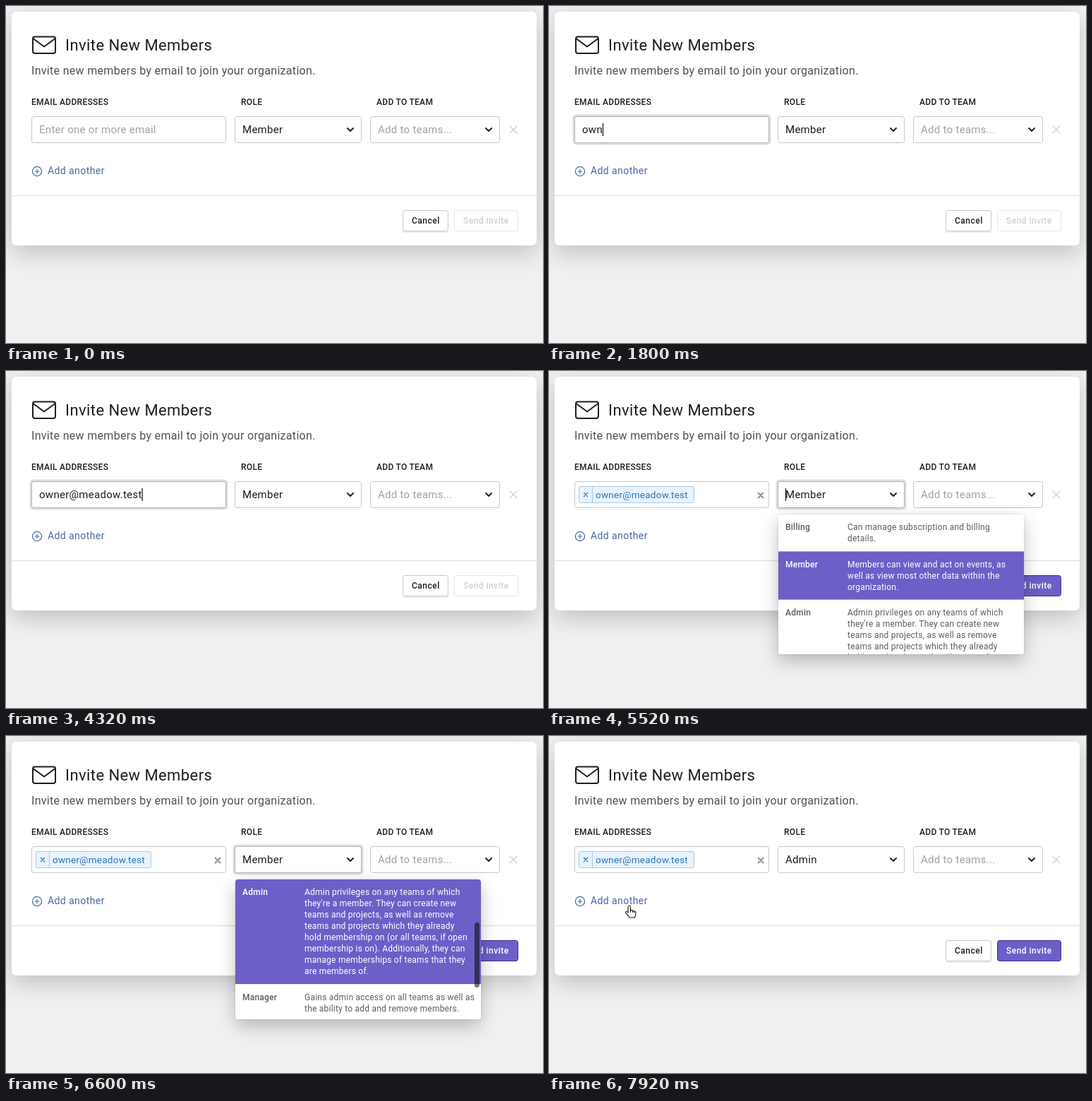
Recreate the animation shown at these times as an HTML page. Size 761 by 477 pixels, loop 8 s.

```html
<!DOCTYPE html>
<html lang="en">
<head>
<meta charset="utf-8">
<title>Invite New Members</title>
<style>
  html, body { margin: 0; width: 100%; height: 100%; overflow: hidden; background: #f0f0f1; }
  svg { display: block; width: 761px; height: 477px; }
  text { font-family: Roboto, Inter, sans-serif; font-size: 15px; letter-spacing: .019em; fill: #1d1d22; white-space: pre; }
  .title { font-size: 22px; }
  .subtitle { font-size: 16px; fill: #505055; }
  .label { font-size: 12px; font-weight: 500; letter-spacing: .025em; }
  .button { font-size: 12px; font-weight: 500; letter-spacing: .04em; }
  .link { font-size: 14px; letter-spacing: .03em; fill: #4a66a5; }
  .hint { fill: #a2a2a6; }
  .chip { font-size: 13.5px; fill: #2676bd; }
  .field { fill: #fff; stroke: #c8c8cc; }
  .focused { stroke: #b2b2b7; }
  .line { fill: none; stroke-linecap: round; stroke-linejoin: round; }
  .panel { filter: drop-shadow(0 10px 16px rgba(0, 0, 0, .2)); }
  .menu-box { filter: drop-shadow(0 9px 13px rgba(0, 0, 0, .22)) drop-shadow(0 0 1px rgba(0, 0, 0, .16)); }
  .row rect { fill: #fff; }
  .row text { font-size: 12px; fill: #5c5c62; }
  .row .name { font-weight: 500; }
  .row.chosen rect { fill: #f4f4f6; }
  .row.chosen text { fill: #29292f; }
  .row.active rect { fill: #6c5fc7; }
  .row.active text { fill: #fff; }
</style>
</head>
<body>
<svg viewBox="0 0 761 477">
  <defs>
    <clipPath id="menuClip"><rect x="325" y="203" width="348" height="198" rx="4"/></clipPath>
    <path id="chevron" class="line" d="M-4-2 0 2 4-2" stroke="#222228" stroke-width="2"/>
    <path id="cross" class="line" d="M-1-1 1 1M1-1-1 1" vector-effect="non-scaling-stroke"/>
  </defs>

  <rect class="panel" x="8" y="8" width="744" height="331" rx="7" fill="#fff"/>
  <g class="line" stroke="#1d1d22" stroke-width="2">
    <rect x="38" y="43.5" width="32" height="23.5" rx="3"/>
    <path d="M39 46.5 54 57.5 69 46.5"/>
  </g>
  <text class="title" x="84" y="62.5">Invite New Members</text>
  <text class="subtitle" x="36" y="97">Invite new members by email to join your organization.</text>
  <text class="label" x="36" y="140">EMAIL ADDRESSES</text>
  <text class="label" x="333" y="140">ROLE</text>
  <text class="label" x="525" y="140">ADD TO TEAM</text>

  <rect id="ring" y="153.5" height="43" rx="5" fill="#dedee1"/>
  <rect id="emailField" class="field" x="36.5" y="156.5" width="275" height="37" rx="3"/>
  <rect id="roleField" class="field" x="324.5" y="156.5" width="179" height="37" rx="3"/>
  <rect class="field" x="516.5" y="156.5" width="183" height="37" rx="3"/>

  <text id="hint" class="hint" x="47" y="180">Enter one or more email</text>
  <text id="typed" x="47" y="180"></text>
  <g id="chip">
    <rect x="42.5" y="163.5" width="163" height="23" rx="2" fill="#e8f3fc" stroke="#a4cdea"/>
    <path d="M61.5 164v22" stroke="#a4cdea"/>
    <use href="#cross" transform="translate(52 175) scale(2.5)" stroke="#2676bd" stroke-width="1.4"/>
    <text id="chipText" class="chip" x="66" y="180"></text>
    <use href="#cross" transform="translate(300 176) scale(3.5)" stroke="#8b8b90" stroke-width="1.8"/>
  </g>

  <text id="role" x="335" y="180">Member</text>
  <text class="hint" x="527" y="180">Add to teams...</text>
  <use href="#chevron" x="488" y="175"/>
  <use href="#chevron" x="684" y="175"/>
  <use href="#cross" transform="translate(719 175) scale(5)" stroke="#cfcfd4" stroke-width="1.1"/>
  <path id="caret" d="M0 166v18" stroke="#111" stroke-width="1.2"/>

  <g class="line" stroke="#4a66a5" stroke-width="1.2">
    <circle cx="44" cy="234" r="6.6"/>
    <path d="M41 234h6M44 231v6"/>
  </g>
  <text class="link" x="59" y="238">Add another</text>
  <path d="M8 268.5H752" stroke="#dcdce2"/>

  <rect x="562" y="290" width="65" height="31" rx="3" fill="#ececef"/>
  <rect class="field" x="562.5" y="289.5" width="64" height="29" rx="3"/>
  <text class="button" x="575" y="308">Cancel</text>
  <rect id="sendBox" x="635.5" y="289.5" width="90" height="29" rx="3"/>
  <text id="sendText" class="button" x="648" y="308">Send invite</text>

  <g id="menu">
    <rect class="menu-box" x="325" y="203" width="348" height="198" rx="4" fill="#fff"/>
    <g clip-path="url(#menuClip)">
      <g id="rows"></g>
      <rect id="thumb" x="664" width="7" height="92" rx="3.5" fill="#000" fill-opacity=".52"/>
    </g>
  </g>

  <g id="cursor" stroke="#111" stroke-width="1.1" stroke-linejoin="round" fill="#fff">
    <path id="arrow" d="M0 0V14L3.3 11 5.5 16 8 15 5.8 10H10Z"/>
    <path id="hand" d="M-2 9V1.2Q-2-.8-.3-.8T1.4 1.2V6Q3.8 4.8 4.4 6.6 6.6 5.6 7 7.4 9.2 6.8 9 9.2 9 12 7.4 16H0Q-1.6 13-4.4 10.6-6.2 8.4-4.6 7.6-3.4 7.2-2 9ZM1.4 6V9M4.4 6.6V9M7 7.4V9.4"/>
  </g>
</svg>
<script>
const LOOP = 8000, STEP = 120;
const EMAIL = 'owner@meadow.test';
const OPTIONS = [
  ['Billing', 'Can manage subscription and billing', 'details.'],
  ['Member', 'Members can view and act on events, as', 'well as view most other data within the', 'organization.'],
  ['Admin', 'Admin privileges on any teams of which', "they're a member. They can create new", 'teams and projects, as well as remove',
    'teams and projects which they already', 'hold membership on (or all teams, if open', 'membership is on). Additionally, they can',
    'manage memberships of teams that they', 'are members of.'],
  ['Manager', 'Gains admin access on all teams as well as', 'the ability to add and remove members.']
];
// Menu states: start time, highlighted option, scroll offset
const MENU = [[5520, 1, 0], [6000, 2, 71], [6360, 3, 121], [6600, 2, 121]];
const FOCUS_EMAIL = 120, TYPE_START = 1440, TYPE_RUN = 1800, TYPE_END = 4320;
const COMMIT = 4800, CLOSE = 6840, LEAVE = 7560, ARRIVE = 7920;

const $ = id => document.getElementById(id);
const show = (id, on) => $(id).setAttribute('visibility', on ? 'inherit' : 'hidden');
const set = (id, attrs) => { for (const k in attrs) $(id).setAttribute(k, attrs[k]); };

function buildRows() {
  let y = 203;
  $('rows').innerHTML = OPTIONS.map(([name, ...lines]) => {
    const height = 16 * lines.length + 20.5;
    const baseline = Math.round(y + 22);
    const details = lines.map((line, i) => `<text x="423" y="${baseline + 16 * i}">${line}</text>`).join('');
    const row = `<g class="row"><rect x="325" y="${y}" width="348" height="${height}"/>
      <path d="M325 ${y + height}h348" stroke="#e2e2e6"/>
      <text class="name" x="335" y="${baseline}">${name}</text>${details}</g>`;
    y += height;
    return row;
  }).join('');
}

function typedCount(t) {
  if (t < TYPE_START) return 0;
  if (t < TYPE_RUN) return 2;
  return Math.min(EMAIL.length, 3 + Math.floor((EMAIL.length - 3) * (t - TYPE_RUN) / (TYPE_END - TYPE_RUN)));
}

function drawFields(t) {
  const onEmail = t >= FOCUS_EMAIL && t < COMMIT;
  const onRole = t >= COMMIT && t < LEAVE;
  const committed = t >= COMMIT;
  const count = typedCount(t);

  show('ring', onEmail || onRole);
  set('ring', onRole ? { x: 321.5, width: 185 } : { x: 33.5, width: 281 });
  $('emailField').classList.toggle('focused', onEmail);
  $('roleField').classList.toggle('focused', onRole);

  $('typed').textContent = EMAIL.slice(0, count);
  show('hint', !count);
  show('typed', !committed);
  show('chip', committed);
  $('role').textContent = t < CLOSE ? 'Member' : 'Admin';

  const blinkOn = count > 0 || (t - FOCUS_EMAIL) % 1000 < 500;
  show('caret', (onEmail && blinkOn) || (onRole && t < 6480));
  const caretX = onRole ? 335.5 : 47.5 + (count ? $('typed').getComputedTextLength() : 0);
  set('caret', { transform: `translate(${caretX})` });

  set('sendBox', committed ? { fill: '#6c5fc7', stroke: '#3f338f' } : { fill: '#fff', stroke: '#e5e5e9' });
  $('sendText').style.fill = committed ? '#fff' : '#cfcfd4';
}

function drawMenu(t) {
  const state = MENU.filter(([start]) => t >= start).pop();
  show('menu', state && t < CLOSE);
  show('thumb', false);
  if (!state || t >= CLOSE) return;
  const [, active, scroll] = state;
  [...$('rows').children].forEach((row, i) => {
    row.classList.toggle('active', i === active);
    row.classList.toggle('chosen', i === 1 && i !== active);
  });
  set('rows', { transform: `translate(0 ${-scroll})` });
  set('thumb', { y: 203.5 + scroll / 2 });
  show('thumb', scroll > 0);
}

function drawCursor(t) {
  show('cursor', t >= LEAVE);
  const left = (1 - Math.min(1, Math.max(0, (t - LEAVE) / (ARRIVE - LEAVE)))) ** 2;
  const x = 114 + 126 * left, y = 241 + 54 * left;
  const onLink = x < 140 && y < 248;
  show('arrow', t >= LEAVE && !onLink);
  show('hand', t >= LEAVE && onLink);
  set('cursor', { transform: `translate(${x} ${y})` });
}

function frame(now) {
  const t = Math.floor(now % LOOP / STEP) * STEP;
  drawFields(t);
  drawMenu(t);
  drawCursor(t);
  requestAnimationFrame(frame);
}

buildRows();
$('chipText').textContent = EMAIL;
frame(0);
</script>
</body>
</html>
```
